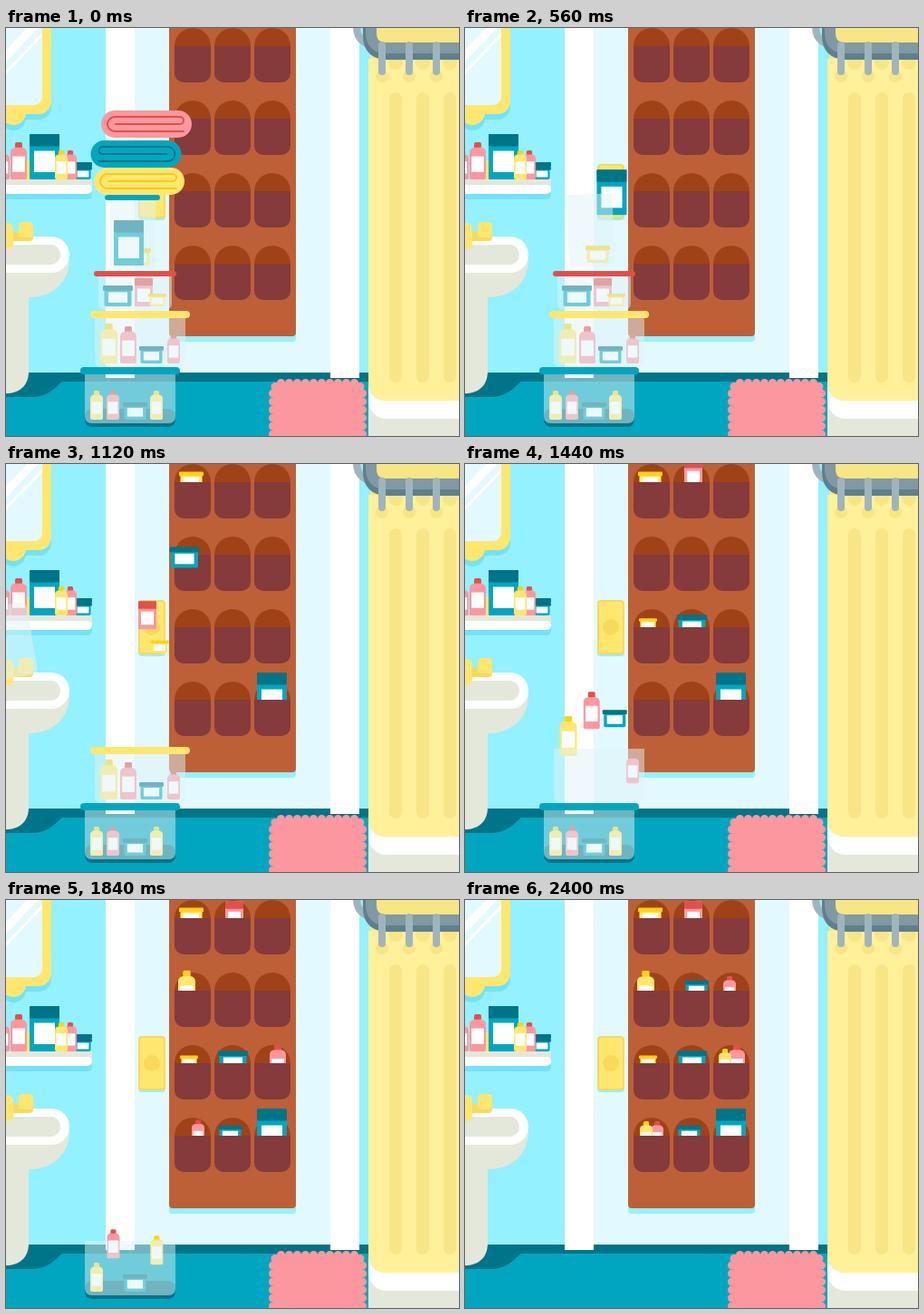
Animation, 500 px wide and 450 px high, one loop 2480 ms. Source, as an HTML page with a canvas:

```html
<!DOCTYPE html>
<html lang="en">
<head>
<meta charset="utf-8">
<title>Bathroom organizer</title>
<style>
html, body { margin: 0; width: 500px; height: 450px; overflow: hidden; }
canvas { display: block; }
</style>
</head>
<body>
<canvas id="stage" width="500" height="450"></canvas>
<script>
const ctx = document.getElementById('stage').getContext('2d');
const LOOP = 2480, STEP = 40;
const WALL = '#94f1ff', SHADE = '#72e3f5', ICE = '#e2faff', WHITE = '#fff', STONE = '#e4e8da';
const TEAL = '#00a6c0', DEEP = '#007488', YELLOW = '#ffe76f', GOLD = '#fdd316', MUSTARD = '#f8d95c';
const PINK = '#fb989f', RED = '#e2504a', CURTAIN = '#fff09a', FOLD = '#f8e585';
const ROD = '#8199a3', ROD_DARK = '#5f7f8f', RING = '#9fb5bd', PLASTIC = 'rgba(224,244,247,.5)';
const PAINT = { teal: [TEAL, DEEP], yellow: [YELLOW, GOLD], pink: [PINK, RED] };

function rect(color, x, y, w, h, r = 0) {
  ctx.fillStyle = color;
  ctx.beginPath();
  ctx.roundRect(x, y, w, h, r);
  ctx.fill();
}
function circle(color, x, y, r) {
  ctx.fillStyle = color;
  ctx.beginPath();
  ctx.arc(x, y, r, 0, 7);
  ctx.fill();
}
function fill(color, d) {
  ctx.fillStyle = color;
  ctx.fill(new Path2D(d));
}
function stroke(color, width, d) {
  ctx.strokeStyle = color;
  ctx.lineWidth = width;
  ctx.lineCap = ctx.lineJoin = 'round';
  ctx.stroke(new Path2D(d));
}

// Height relative to width, and the share that shows above a pocket
const KINDS = {
  bottle: { ratio: 2.3, show: .5 },
  jar: { ratio: .7, show: .6 },
  tub: { ratio: 1.53, show: .6 }
};
const heightOf = (kind, w) => Math.round(w * KINDS[kind].ratio);

function container(kind, paint, x, y, w) {
  const h = heightOf(kind, w), [body, cap] = PAINT[paint];
  if (kind === 'bottle') {
    rect(cap, x + w * .28, y, w * .44, h * .2, 1.5);
    rect(body, x, y + h * .14, w, h * .86, [w * .3, w * .3, 2, 2]);
    rect(WHITE, x + w * .12, y + h * .38, w * .76, h * .42);
  } else if (kind === 'jar') {
    rect(body, x + 1.5, y + h * .2, w - 3, h * .8, [0, 0, 2, 2]);
    rect(cap, x, y, w, h * .25, 1);
    rect(WHITE, x + w * .18, y + h * .32, w * .64, h * .5);
  } else {
    rect(body, x, y, w, h, 1);
    rect(cap, x, y, w, h * .27, 1);
    rect(WHITE, x + w * .15, y + h * .37, w * .7, h * .47);
  }
}

// Items: kind, paint, width, x in the box, x in the pocket, pocket row, wait after opening
const boxes = [
  { x: 114, y: 186, w: 51, h: 80, lid: TEAL, items: [
    ['jar', 'yellow', 27, 133, 191, 0, 290],
    ['tub', 'teal', 33, 119, 277, 3, 135]] },
  { x: 102, y: 270, w: 81, h: 41, lid: RED, items: [
    ['jar', 'teal', 33, 107, 234, 2, 135],
    ['tub', 'pink', 20, 142, 242, 0, 270],
    ['jar', 'yellow', 20, 157, 192, 2, 250]] },
  { x: 98, y: 314, w: 100, h: 60, lid: YELLOW, items: [
    ['bottle', 'yellow', 19, 104, 190, 1, 155],
    ['bottle', 'pink', 18, 126, 291, 2, 120],
    ['jar', 'teal', 27, 147, 234, 3, 100],
    ['bottle', 'pink', 14, 178, 205, 3, 170]] },
  { x: 87, y: 376, w: 100, h: 60, lid: TEAL, items: [
    ['bottle', 'yellow', 14, 93, 193, 3, 230],
    ['bottle', 'pink', 14, 111, 285, 1, 90],
    ['jar', 'teal', 27, 129, 242, 1, 190],
    ['bottle', 'yellow', 14, 159, 280, 2, 90]] }
];
boxes.forEach((box, i) => box.opens = 252 + 480 * i);
const FLIGHT = 480, ARC = 115, BOX_STAY = 292;

const towels = [
  [YELLOW, '#f9c918', 97, 154], [TEAL, DEEP, 93.5, 124], [PINK, RED, 105, 91]
];

function drawMirror() {
  for (const [color, drop] of [[SHADE, 6], [YELLOW, 0]]) {
    circle(color, 8, 93 + drop, 14);
    rect(color, -20, -20, 70, 115 + drop, 14);
  }
  rect(ICE, -20, -20, 60, 105, 9);
  ctx.save();
  ctx.beginPath();
  ctx.rect(0, 0, 40, 85);
  ctx.clip();
  stroke(WHITE, 9, 'M-6 37L37 -8');
  stroke(WHITE, 3, 'M-6 55L46 1');
  ctx.restore();
}

function drawShelf() {
  rect(SHADE, -5, 176, 100, 13, 5);
  rect(STONE, -5, 167, 100, 12, [0, 2, 0, 0]);
  rect(WHITE, -5, 173, 100, 10, 5);
  const stand = (kind, paint, x, w) => container(kind, paint, x, 167 - heightOf(kind, w), w);
  rect(YELLOW, 18, 146, 10, 21);
  stand('bottle', 'pink', -10, 14);
  stand('bottle', 'pink', 5, 18);
  stand('tub', 'teal', 26, 33);
  stand('jar', 'teal', 75, 20);
  rect(DEEP, 75, 148, 20, 5, 1);
  stand('bottle', 'pink', 64, 14);
  stand('bottle', 'yellow', 54, 14);
}

function drawSink() {
  fill(DEEP, 'M0 388H64C54 397 46 407 28 407H0Z');
  fill(STONE, 'M0 255H70C70 280 52 297 25 297V379C25 395 14 403 0 403Z');
  rect(WHITE, -30, 230, 100, 40, 20);
  rect(STONE, -30, 239, 90, 22, 11);
  rect(MUSTARD, -6, 225, 28, 10, 3);
  rect(YELLOW, -8, 215, 16, 29, 6);
  rect(MUSTARD, 14, 216, 16, 19, 4);
  rect(YELLOW, 14, 214, 16, 17, 4);
}

function drawDoor() {
  rect(ICE, 142, 0, 216, 380);
  rect(WHITE, 110, 0, 32, 386);
  rect(WHITE, 358, 0, 32, 386);
  rect(WALL, 146, 155, 30, 57, 4);
  rect(MUSTARD, 146, 150, 30, 60, 4);
  rect(YELLOW, 148, 152, 26, 56, 3);
  circle(MUSTARD, 161, 180, 9);
  rect(WALL, 180, 300, 140, 46, 4);
  rect('#bd6037', 180, -10, 140, 350, 4);
  for (let y = 0; y < 320; y += 80)
    for (let x = 186; x < 300; x += 44) {
      rect('#a04217', x, y, 40, 40, [20, 20, 0, 0]);
      rect('#853a3b', x, y + 20, 40, 40, [0, 0, 10, 10]);
    }
}

function drawRug() {
  rect(PINK, 295, 392, 98, 70, 6);
  for (let i = 0; i < 10; i++) circle(PINK, 303.5 + i * 9, 391.5, 4.5);
  for (const x of [294.5, 393.5]) {
    for (let y = 403; y < 460; y += 9) circle(PINK, x, y, 4.5);
    circle(PINK, x < 300 ? 297 : 391, 395.5, 4.5);
  }
}

function drawShower() {
  rect(STONE, 400, 380, 100, 70);
  rect(WHITE, 400, 380, 110, 51, [0, 0, 0, 20]);
  rect(FOLD, 402, 0, 98, 36);
  rect(CURTAIN, 400, 34, 110, 377, [0, 0, 0, 18]);
  for (let x = 415; x < 500; x += 30) {
    rect(FOLD, x + 8, 71, 14, 320, 7);
    circle(FOLD, x + 15, 38, 8);
    circle(FOLD, x, 53, 7);
  }
  stroke(RING, 8, 'M387 -2Q387 12 398 17');
  stroke(ROD_DARK, 10, 'M399 -5V8Q399 30 421 30H510');
  stroke(ROD, 12, 'M403 -5V5Q403 22 420 22H510');
  for (let x = 415; x < 500; x += 30) rect(RING, x - 4, 15, 8, 37, 4);
}

function drawRoom() {
  rect(WALL, 0, 0, 500, 450);
  rect(DEEP, 0, 380, 500, 10);
  rect(TEAL, 0, 390, 500, 60);
  drawMirror();
  drawSink();
  drawDoor();
  drawShelf();
  drawRug();
  drawShower();
}

// Each item leaps out of its box on a cubic arc and drops behind a pocket edge
function drawItem(t, box, [kind, paint, w, x0, x1, row, wait]) {
  const h = heightOf(kind, w), edge = row * 80 + 20;
  const y0 = box.y + box.h - 4 - h, y1 = edge - h * KINDS[kind].show;
  const p = Math.min(1, Math.max(0, (t - box.opens - wait) / FLIGHT));
  const u = p < .5 ? 2 * p * p : 1 - 2 * (1 - p) ** 2, v = 1 - u;
  const x = x0 + (x1 - x0) * u * u * (3 - 2 * u);
  const y = y0 * v ** 3 + 3 * (y1 - ARC) * u * v + y1 * u ** 3;
  ctx.save();
  if (u > .5) {
    ctx.beginPath();
    ctx.rect(0, 0, 500, edge);
    ctx.clip();
  }
  container(kind, paint, x, y, w);
  ctx.restore();
}

// Spin a piece away to the upper left, accelerating
function toss(elapsed, dx, dy, color, x, y, w, h, r) {
  const a = (Math.max(0, elapsed) / 68) ** 2;
  if (a > 12) return;
  ctx.save();
  ctx.translate(x + w / 2 - dx * a ** 1.4, y + h / 2 - dy * a);
  ctx.rotate(-50 * a * Math.PI / 180);
  rect(color, -w / 2, -h / 2, w, h, r);
  ctx.restore();
}

function drawTowel(t, [color, line, x, y], i) {
  const elapsed = Math.max(0, t - 102 + 40 * i);
  ctx.save();
  ctx.translate(x, y - .00316 * elapsed ** 2);
  rect(color, 0, 0, 100, 30, 15);
  if (i === 1) { ctx.translate(100, 0); ctx.scale(-1, 1); }
  stroke(line, 2, 'M91 23H15a8 8 0 0 1 0-16H87a4 4 0 0 1 0 8H16');
  ctx.restore();
}

function draw(t) {
  drawRoom();
  const last = boxes[boxes.length - 1];
  if (t < last.opens + BOX_STAY) rect(DEEP, last.x, 420, last.w, 20, 8);
  for (const box of boxes) box.items.forEach(item => drawItem(t, box, item));
  for (const { x, y, w, h, opens } of boxes)
    toss(t - opens - BOX_STAY, 51, 48, PLASTIC, x, y, w, h, [0, 0, 7, 7]);
  for (const { x, y, w, lid, opens } of boxes) {
    const thick = w < 90 ? 6 : 8;
    toss(t - opens, 43, 77, lid, x - 5, y - 2, w + 10, thick, thick / 2);
  }
  towels.forEach((towel, i) => drawTowel(t, towel, i));
}

function tick() {
  draw(Math.min(LOOP - 2 * STEP, Math.floor(performance.now() % LOOP / STEP) * STEP));
  requestAnimationFrame(tick);
}
tick();
</script>
</body>
</html>
```
